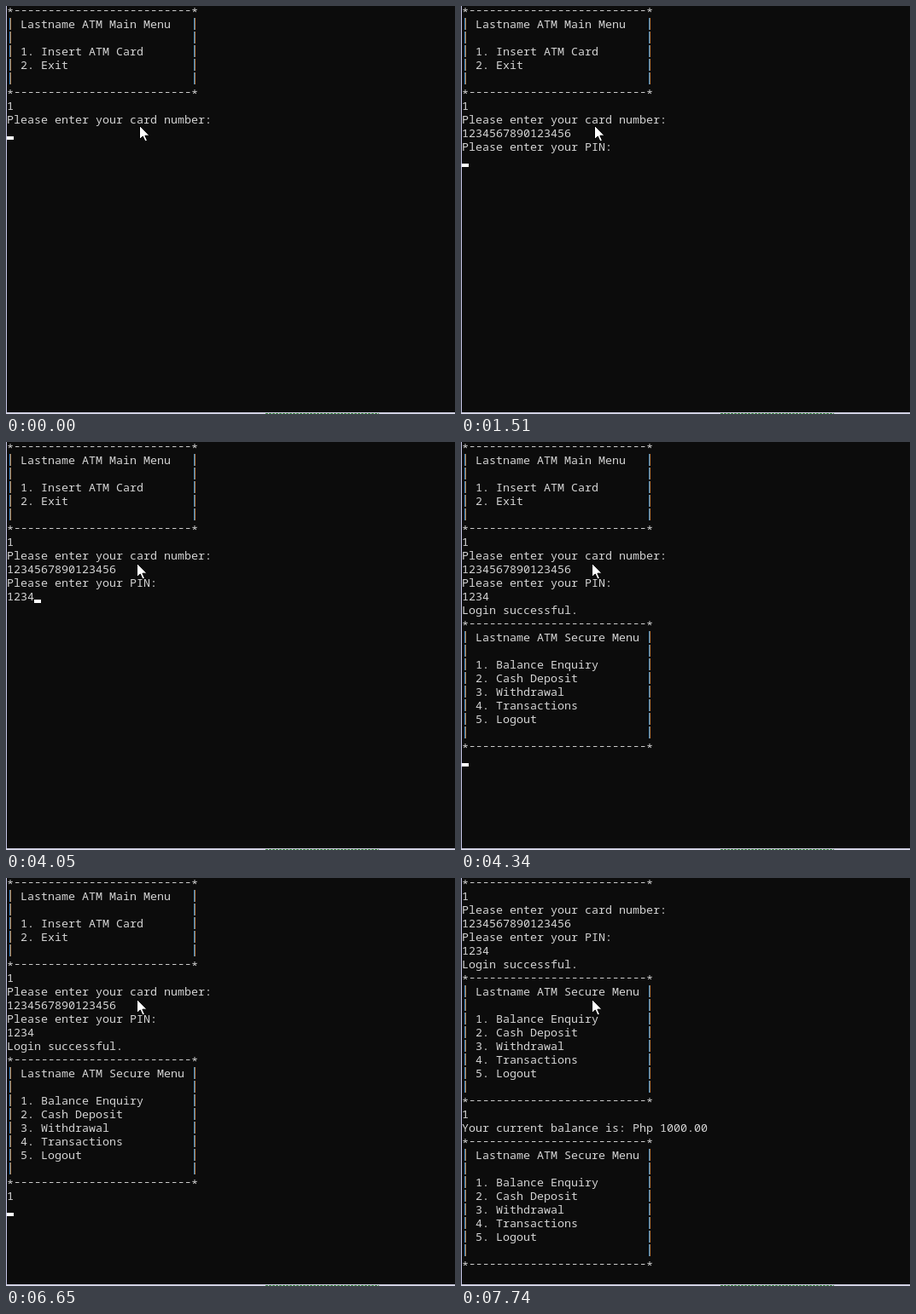
Write an HTML page that moves like this. It is 526 px wide and 479 px high and loops after 8000 ms.

```html
<!DOCTYPE html>
<html lang="en">
<head>
<meta charset="utf-8">
<title>ATM console</title>
<style>
html, body { margin: 0; width: 100%; height: 100%; overflow: hidden; background: #0c0c0c; }
body > * { position: absolute; }
pre {
  left: 1px; top: -3px; margin: 0; color: #d4d4d4;
  font: 13.333px/16px "Noto Sans Mono", "Liberation Mono", monospace;
}
pre * { display: inline-block; height: 16px; vertical-align: top; font-style: normal; font-weight: normal; text-decoration: none; }
/* bars and dashes are one crisp stroke; bars carry subpixel colour fringes */
i { color: transparent; background: linear-gradient(90deg, #3f8fcc 50%, #b98048 50%) 3px 1px / 2px 14px no-repeat; }
b { position: relative; top: 2px; }
u { color: transparent; background: linear-gradient(90deg, #0000 2px, #ccc 2px 6px, #ccc6 6px 7px, #0000 7px) 0 8px / 8px 1px repeat-x; }
#caret { left: 0; top: 0; width: 8px; height: 4px; background: #fff; }
#edge { left: 0; top: 0; width: 1px; height: 477px; background: #c6c6e6; }
#base { left: 0; top: 477px; width: 526px; height: 2px; background: #d2d2e4; }
#dash {
  left: 304px; top: 478px; width: 133px; height: 1px;
  background: repeating-linear-gradient(90deg, #2f7a35 0 3px, #d2d2e4 3px 4px);
}
#pointer { left: 0; top: 0; }
</style>
</head>
<body>
<pre id="screen"></pre>
<div id="caret"></div>
<div id="edge"></div>
<div id="base"></div>
<div id="dash"></div>
<svg id="pointer" width="14" height="21">
  <path d="M.5 .5V16.5L4.3 13 7 19 9.5 18 6.9 12.2H12Z" fill="#fff" stroke="#000"/>
</svg>
<script>
const LOOP = 8000, ROW = 16, COL = 8;
const $ = id => document.getElementById(id);
const rule = "*" + "-".repeat(26) + "*";
const menu = (title, ...items) => [
  rule,
  ...[title, "", ...items.map((s, i) => `${i + 1}. ${s}`), ""].map(s => `| ${s.padEnd(25)}|`),
  rule
];
const secure = menu("Lastname ATM Secure Menu",
  "Balance Enquiry", "Cash Deposit", "Withdrawal", "Transactions", "Logout");
const card = "1234567890123456", pin = "1234";
const log = [
  ...menu("Lastname ATM Main Menu", "Insert ATM Card", "Exit"),
  "1", "Please enter your card number:", card,
  "Please enter your PIN:", pin,
  "Login successful.", ...secure,
  "1", "Your current balance is: Php 1000.00", ...secure
];

// start time, finished lines, typed input, caret visible
const steps = [
  [0, 9, "", 1],
  [420, 9, card, 1],
  [550, 9, card, 0],
  [830, 9, card, 1],
  [1390, 11, "", 0],
  [1510, 11, "", 1],
  [2440, 11, "", 0],
  [2590, 11, "1", 1],
  [2740, 11, "12", 1],
  [2990, 11, "123", 1],
  [3250, 11, pin, 1],
  [3540, 11, pin, 0],
  [3920, 11, pin, 1],
  [4340, 23, "", 1],
  [5170, 23, "", 0],
  [5570, 23, "", 1],
  [5870, 23, "1", 1],
  [6120, 23, "1", 0],
  [6650, 24, "", 1],
  [6800, 35, "", 1],
  [7740, 35, "", 0]
];
const moves = [[0, 156, 140], [3920, 154, 141], [4050, 153, 142]];

const at = (list, t) => list.findLast(s => s[0] <= t);
const place = (el, x, y) => el.style.transform = `translate(${x}px,${y}px)`;
const markup = s => s.replace(/\||\*|-+/g, m => {
  const tag = { "|": "i", "*": "b" }[m] || "u";
  return `<${tag}>${m}</${tag}>`;
});

let shown;
function draw() {
  const t = performance.now() % LOOP;
  const step = at(steps, t);
  if (step !== shown) {
    const [, count, typed, on] = shown = step;
    const top = Math.max(0, count - 29);
    $("screen").innerHTML = markup([...log.slice(top, count), typed].join("\n"));
    $("caret").style.visibility = on ? "visible" : "hidden";
    place($("caret"), 1 + typed.length * COL, (count - top) * ROW + 9);
  }
  const [, x, y] = at(moves, t);
  place($("pointer"), x, y);
  requestAnimationFrame(draw);
}
draw();
</script>
</body>
</html>
```
